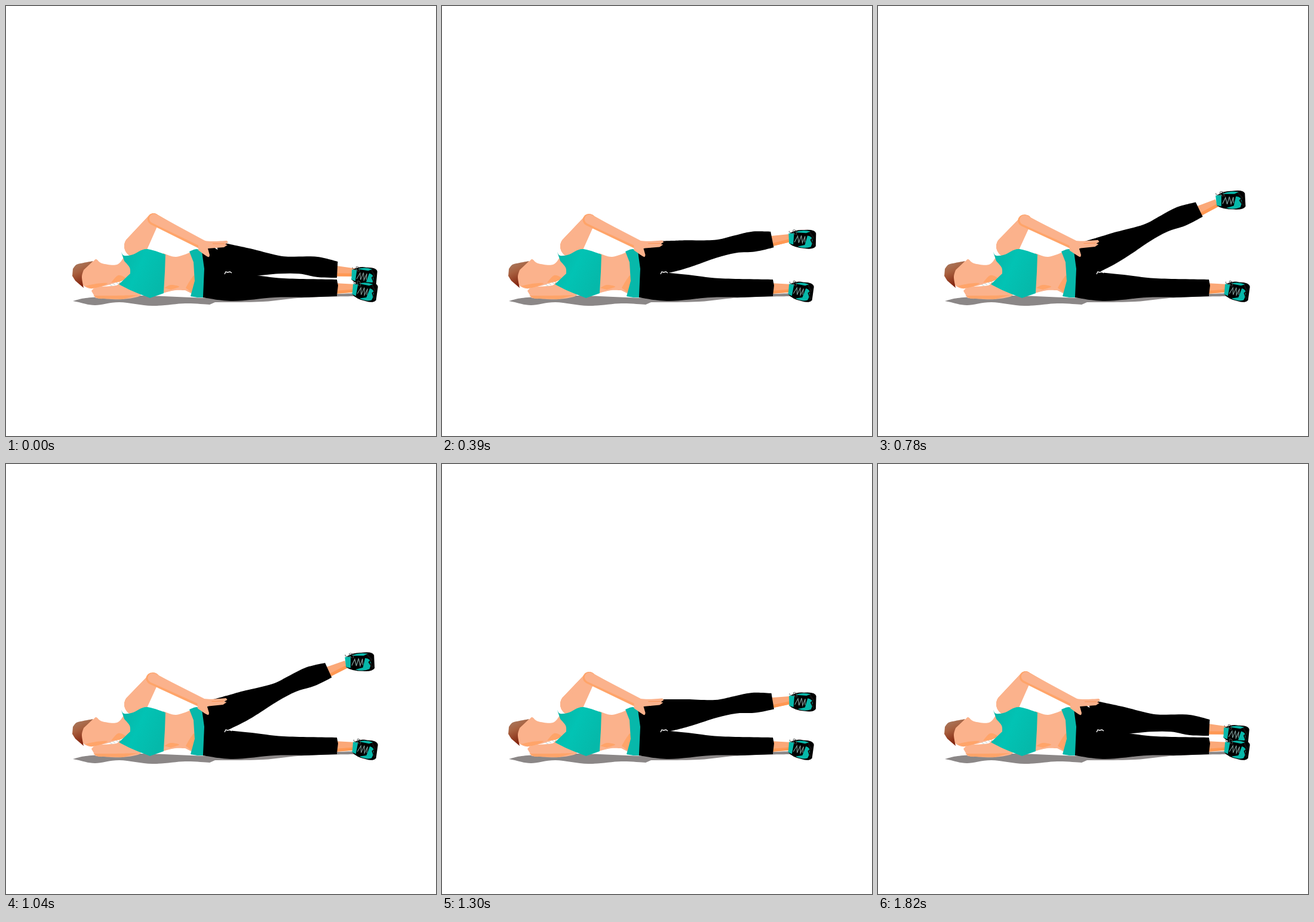
An HTML page that plays this animation: 720 px wide and 720 px high, repeating every 1950 ms.

```html
<!DOCTYPE html>
<html lang="en">
<head>
<meta charset="utf-8">
<title>Side leg raise</title>
<style>
html, body { margin: 0; width: 100%; height: 100%; overflow: hidden; background: #fff; }
svg { display: block; width: 100vw; height: 100vh; }
.skin { fill: #fbb28c; }
.tan { fill: #ffa469; }
.teal { fill: #07b8aa; }
.line { fill: none; }
</style>
</head>
<body>
<svg viewBox="0 0 720 720">
  <defs>
    <linearGradient id="hair" x1="0" y1="0" x2=".35" y2="1">
      <stop offset="0" stop-color="#a98068"/><stop offset=".45" stop-color="#a8603f"/><stop offset="1" stop-color="#7e1d08"/>
    </linearGradient>
    <linearGradient id="cloth" x1="0" y1="0" x2="1" y2=".5">
      <stop offset="0" stop-color="#08b3a4"/><stop offset=".5" stop-color="#02c3b4"/><stop offset="1" stop-color="#05b9aa"/>
    </linearGradient>
    <g id="shoe">
      <path d="M-20 -10Q-10 -16 2 -15Q20 -17 22 -10L22 11Q18 17 4 15Q-14 14 -22 7Z"/>
      <path class="teal" d="M-23 -9L-14 -10-15 9-22 7ZM-13 -11Q-2 -16 13 -13L6 -10ZM-8 12L4 9 8 -6Q17 -5 17 4L14 12Q4 16 -8 12Z"/>
      <path class="line" stroke="#111" stroke-width="2.4" d="M11 -12l7 9-4 4 5 9"/>
      <path class="line" stroke="#7d9b98" stroke-width="1.2" d="M-13 5l5-10 2 11 4-12 2 12 4-11 0 10"/>
      <path class="line" stroke="#555" stroke-width=".9" d="M-12 -7q-7-8-2-8t4 8m-5-2q-9-1-7-4"/>
    </g>
    <g id="shin">
      <path fill="#fba878" d="M200 -7L237 -5 237 8 200 11Z"/>
      <path fill="#ff9853" d="M200 6L237 3 237 8 200 11Z"/>
    </g>
  </defs>

  <path fill="#8b8787" data-c="112 494 143 488 230 485 345 489 480 485 583 481|600 489 621 496|582 486 500 488 430 495 350 496|341 500 300 498 245 502 190 496 149 501 122 496"/>

  <g id="leg">
    <use href="#shin"/>
    <use id="foot" href="#shoe"/>
    <path data-c="0 -30 40 -25 64 -22 110 -15 142 -17 173 -19 205 -14|206 13 174 15 142 12 108 15 70 22 42 26 12 28"/>
  </g>
  <path d="M328 411L345 402 372 420 374 446 350 475 330 484Z"/>

  <use href="#shin" transform="translate(350 471)"/>
  <use href="#shoe" transform="translate(601 478) rotate(8) scale(.93 1.06)"/>
  <path data-c="330 440 372 446 412 450 465 456 554 458|556 468 554 486|500 488 450 488 380 494 329 488"/>
  <path class="line" stroke="#fff" stroke-width="1.4" d="M366 449l2-4 3 1 4-1 3 2"/>

  <path class="skin" data-c="143 477 152 471 184 468 194 463 226 483 195 491 150 489"/>
  <path class="tan" data-c="146 485 180 485 222 484|195 491 155 490"/>
  <path class="line" stroke="#cfd6d6" stroke-width="1.3" d="M170 464l8 5m-4-7l9 5m-5-8l10 6"/>
  <path class="skin" data-c="118 440 130 431 145 428 151 424 161 431 186 433 199 418|213 430 209 448 194 460|168 468 140 473 122 462"/>
  <path class="tan" data-c="132 469 151 465 170 464 158 470 143 473"/>
  <path class="tan" data-c="176 463 188 451 200 456 190 462"/>
  <path fill="url(#hair)" data-c="112 440 118 433 130 430 146 427|130 442 127 454 130 472|116 460 111 452"/>

  <path class="skin" data-c="263 414 285 420 312 411|318 440 314 483|300 476 283 476 262 481"/>
  <path class="tan" data-c="265 472 276 467 290 470 276 475"/>
  <path class="tan" data-c="301 472 308 460 316 452 314 482"/>
  <path class="teal" data-c="307 411 319 407 328 411|332 440 330 488|320 488 309 486|316 460 314 429"/>

  <g id="upper"></g>
  <path fill="url(#cloth)" data-c="193 412 198 418 213 416 235 407 267 416|266 445 264 481|241 489 211 477 189 466|208 448 207 438 198 427"/>
  <g id="fore">
    <path class="skin" data-c="322 391 342 394 370 393|372 396 367 399|371 400 365 404|338 406|341 417 338 420 322 409"/>
    <path class="line" stroke="#f99658" d="M346 398l20 0"/>
  </g>
</svg>
<script>
const STEP = 130, COUNT = 15, PEAK = 7;
const $ = id => document.getElementById(id);
const put = (id, value) => $(id).setAttribute("transform", value);

// Smooth curve through a run of [x, y] points.
function spline(pts) {
  const at = i => pts[Math.max(0, Math.min(pts.length - 1, i))];
  const lean = (p, from, to) => p.map((v, j) => v + (to[j] - from[j]) / 6).join(" ");
  return pts[0].join(" ") + pts.slice(1).map((p, i) =>
    `C${lean(pts[i], at(i - 1), p)} ${lean(p, at(i + 2), pts[i])} ${p.join(" ")}`).join("");
}

// Runs parted by "|" meet in sharp corners.
function outline(text) {
  const runs = text.split("|").map(run => run.match(/\S+ \S+/g).map(p => p.split(" ").map(Number)));
  return "M" + runs.map(spline).join("L") + "Z";
}

// Tapered limb with round ends.
function limb(id, kind, x1, y1, r1, x2, y2, r2) {
  const a = Math.atan2(y2 - y1, x2 - x1), nx = Math.sin(a), ny = -Math.cos(a);
  const el = document.createElementNS("http://www.w3.org/2000/svg", "path");
  el.setAttribute("class", kind);
  el.setAttribute("d", `M${x1 + nx * r1} ${y1 + ny * r1}L${x2 + nx * r2} ${y2 + ny * r2}`
    + `A${r2} ${r2} 0 0 1 ${x2 - nx * r2} ${y2 - ny * r2}L${x1 - nx * r1} ${y1 - ny * r1}`
    + `A${r1} ${r1} 0 0 1 ${x1 + nx * r1} ${y1 + ny * r1}Z`);
  $(id).prepend(el);
}

document.querySelectorAll("[data-c]").forEach(el => el.setAttribute("d", outline(el.dataset.c)));
limb("upper", "tan", 247, 357, 10, 217, 402, 19);
$("upper").append($("upper").firstChild);
limb("fore", "skin", 248, 356, 8, 330, 398, 6);
limb("fore", "tan", 247, 357, 10, 327, 400, 7);
limb("upper", "skin", 247, 357, 10, 217, 402, 19);
$("upper").append($("upper").firstChild);
limb("upper", "skin", 249, 359, 8, 222, 403, 15);
$("upper").append($("upper").firstChild);

// Rises gently, falls faster.
const lift = i => Math.sin(Math.PI * i / (2 * PEAK)) ** (i < PEAK ? 1.6 : 3.6);

function pose(p) {
  const angle = 5 - 30 * p;
  put("leg", `translate(350 424) rotate(${angle})`);
  put("foot", `translate(${253 - .3 * angle} 7) rotate(${4 - .7 * angle}) scale(${.95 + .15 * p} 1.03)`);
  put("upper", `translate(0 ${15 * p}) scale(1 ${1 - .036 * p})`);
  put("fore", `translate(${-3 * p} ${2.5 * p}) rotate(${-1.7 * p} 245 350)`);
}

const start = performance.now();
function tick(now) {
  pose(lift(Math.floor(Math.max(0, now - start) / STEP) % COUNT));
  requestAnimationFrame(tick);
}
pose(0);
requestAnimationFrame(tick);
</script>
</body>
</html>
```
